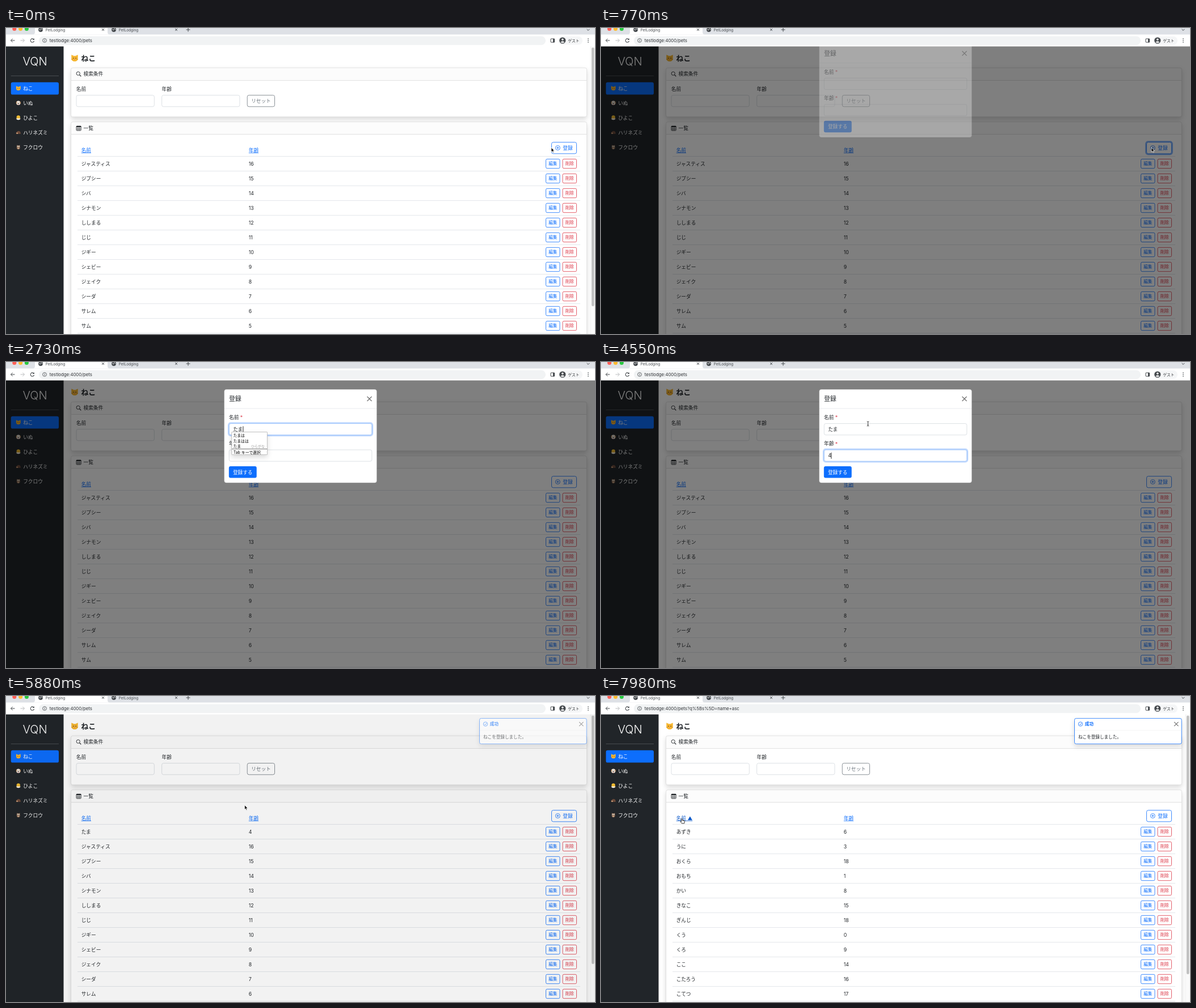
An HTML page for the animation above (8 s loop, 1038 by 540 pixels).

```html
<!DOCTYPE html>
<html>
<head>
<meta charset="utf-8">
<style>
html, body { margin: 0; width: 100%; height: 100%; overflow: hidden; background: #fff; }
svg { display: block; font-family: Inter, "Noto Sans CJK JP", "Noto Sans CJK", sans-serif; }
text { white-space: pre; }
.shadow { filter: drop-shadow(0 4.3px 4.3px rgba(0, 0, 0, .15)); }
.link { text-decoration: underline; }
</style>
</head>
<body>
<svg id="stage" width="1038" height="540" viewBox="0 0 1038 540"></svg>
<script>
const BLUE = '#0d6efd', RED = '#dc3545', GRAY = '#6c757d', INK = '#212529', LINE = '#dee2e6', EDGE = '#ced4da';
const LOOP = 8000, STEP = 70, BASE = 8.67;
const URL_TEXT = 'testlodge:4000/pets';

// ---- markup helpers ----
const text = (x, y, s, size = BASE, fill = INK, more = '') =>
  `<text x="${x}" y="${y}" font-size="${size}" fill="${fill}" ${more}>${s}</text>`;
const rect = (x, y, w, h, fill = 'none', stroke = 'none', r = 0, more = '') =>
  `<rect x="${x}" y="${y}" width="${w}" height="${h}" rx="${r}" fill="${fill}" stroke="${stroke}" ${more}/>`;
const circle = (x, y, r, fill = 'none', stroke = 'none', w = 1) =>
  `<circle cx="${x}" cy="${y}" r="${r}" fill="${fill}" stroke="${stroke}" stroke-width="${w}"/>`;
const path = (d, stroke = INK, w = 1, fill = 'none', more = '') =>
  `<path d="${d}" stroke="${stroke}" stroke-width="${w}" fill="${fill}" ${more}/>`;
const group = (id, body, more = '') => `<g id="${id}" ${more}>${body}</g>`;
const at = (x, y, body, k = 1) => `<g transform="translate(${x} ${y}) scale(${k})">${body}</g>`;
const cross = (x, y, r, stroke, w) => path(`M${x - r} ${y - r}l${2 * r} ${2 * r}m0 ${-2 * r}l${-2 * r} ${2 * r}`, stroke, w);
const ring = (id, x, y, w, h, color) => rect(x - 1.3, y - 1.3, w + 2.6, h + 2.6, 'none', color, 4, `id="${id}" stroke-width="2.2"`);
const MID = 'text-anchor="middle"';

// ---- small animal faces, about 9 px wide ----
const eyes = circle(-1.6, 0, .6, '#3b2a20') + circle(1.6, 0, .6, '#3b2a20');
const cat = path('M-4.4 -4.6L-1 -3 1 -3 4.4 -4.6 4.4 1Q4 4.4 0 4.4 -4 4.4 -4.4 1Z', 'none', 0, '#f7b731') +
  eyes + path('M-4.6 1.6h2M2.6 1.6h2', '#b8741a', .5) + circle(0, 1.6, .6, '#e2697a');
const dog = circle(0, 0, 4.2, '#ece3d8') + path('M-3 -3.4Q-5.6 -2 -4 2.4ZM3 -3.4Q5.6 -2 4 2.4Z', 'none', 0, '#b5793e') +
  eyes + circle(0, 1.5, .9, '#3b2a20') + circle(0, 3.1, .7, '#e2697a');
const chick = circle(0, -1, 3.6, '#fbc531') + path('M-4.4 .8l1.5 1 1.5-1 1.4 1 1.4-1 1.5 1 1.5-1Q4 4.5 0 4.5 -4 4.5 -4.4 .8Z', 'none', 0, '#f5efe2') +
  circle(-1.4, -1.4, .5, '#3b2a20') + circle(1.4, -1.4, .5, '#3b2a20') + circle(0, -.2, .7, '#ee7f2d');
const hedgehog = path('M-4.6 1.5Q-3.4 -3 1 -2.8 4.6 -2.4 4.6 2.8L-2.5 3Z', 'none', 0, '#6b4a3a') +
  path('M-4.8 1.6Q-2.6 -.8 -1 1.4L-1.4 3-3.6 2.8Z', 'none', 0, '#d2a27c') + circle(-4.4, 1.6, .5, '#221a16');
const owl = path('M-3 -4.4L0 -3.4 3 -4.4 3.4 1Q3 4.4 0 4.4 -3 4.4 -3.4 1Z', 'none', 0, '#8a6a55') +
  circle(-1.4, -1.6, 1.2, '#f3ead9') + circle(1.4, -1.6, 1.2, '#f3ead9') + circle(-1.4, -1.6, .5, '#222') +
  circle(1.4, -1.6, .5, '#222') + rect(-1.6, .8, 3.2, 2.8, '#c9ab8d', 'none', 1.4);

// ---- browser frame ----
function tab(x) {
  return circle(x, 3, 3.9, '#45494d') + path(`M${x - 2.6} 1.6l2 1 -.6 1.8M${x + .6} 0l.6 1.8 1.6 .8`, '#fff', .9) +
    text(x + 8.8, 5.5, 'PetLodging', 6.4, '#45494d') + cross(x + 110, 3, 2, '#45494d', .9);
}
function browser() {
  const lights = ['#ff5f57', '#febc2e', '#28c840'].map((c, i) => circle(14.8 + 10.8 * i, 1.4, 3.5, c)).join('');
  const dots = [-3, 0, 3].map(d => circle(1026, 22 + d, .85, '#45494d')).join('');
  return rect(0, 0, 1038, 32.5, '#fff') + rect(0, 0, 1038, 11.5, '#dee1e6') +
    path('M47 11.5Q51 11.5 51 7V0H179V7Q179 11.5 183 11.5Z', 'none', 0, '#fff') +
    lights + tab(61) + tab(190) +
    path('M317.5 3h7M321 -.5v7', '#45494d', 1) + path('M1023.6 2l2.4 2.4 2.4-2.4', '#45494d', 1) +
    path('M15.5 22h-7m3.2-3.2L8.5 22l3.2 3.2', '#45494d', 1) +
    path('M25.5 22h7m-3.2-3.2l3.2 3.2 -3.2 3.2', '#babcbe', 1) +
    path('M49 20.2A3.2 3.2 0 1 0 49.5 23', '#45494d', 1.1) + path('M49.8 18.2v2.9h-2.9Z', 'none', 0, '#45494d') +
    rect(58, 14.5, 893, 15.5, '#f1f3f4', 'none', 7.7) +
    circle(68, 22, 3.4, 'none', '#45494d', .8) + path('M68 21.5v2.3M68 19.8v.9', '#45494d', .9) +
    text(76.8, 24.8, URL_TEXT, 7.8, '#303337', 'id="url"') +
    rect(960, 19, 6.6, 6.2, 'none', '#45494d', .6) + rect(964, 19, 2.8, 6.2, '#45494d') +
    rect(973, 14.8, 43, 14.8, '#f5f6f7', 'none', 7.4) +
    circle(980.8, 22, 5.6, '#45494d') + circle(980.8, 20.3, 1.7, '#fff') + path('M977.4 25Q980.8 21.6 984.2 25Q980.8 27.4 977.4 25Z', 'none', 0, '#fff') +
    text(990.5, 24.7, 'ゲスト', 6.6, '#303337') + dots;
}

// ---- page ----
function sidebar() {
  const items = [[cat, 'ねこ'], [dog, 'いぬ'], [chick, 'ひよこ'], [hedgehog, 'ハリネズミ'], [owl, 'フクロウ']];
  return rect(0, 32, 101.5, 508, INK) + text(51, 66.3, 'VQN', 20, '#fff', MID + ' font-weight="300"') +
    rect(8.7, 84.2, 84.3, .7, '#5b5f63') + rect(8.7, 95.8, 84.3, 21.8, BLUE, 'none', 3.2) +
    items.map(([icon, s], i) => at(21.8, 106.3 + 26 * i, icon, .88) + text(30.2, 109.6 + 26 * i, s, BASE, '#fff')).join('');
}
function rows(id, names, ages) {
  return group(id, names.split(' ').map((s, i) => text(132.7, 242.7 + 26 * i, s) + text(427.8, 242.7 + 26 * i, ages[i])).join(''));
}
function smallButton(x, y, s, color) {
  return rect(x, y, 24.5, 16.4, 'none', color, 2.2, 'stroke-width=".8"') + text(x + 12.25, y + 11, s, 7.58, color, MID);
}
const addLabel = color => circle(972.4, 211.5, 4, 'none', color, .8) + path('M970.2 211.5h4.4M972.4 209.3v4.4', color, .8) +
  text(981.3, 214.8, '登録', BASE, color);
function page() {
  const card = (y, h) => `<g class="shadow">${rect(114.5, y, 909, h, '#fff', '#d8d8d8', 3.2, 'stroke-width=".7"')}</g>` +
    rect(115, y + .5, 908, 21.5, 'rgba(0,0,0,.01)') + rect(115, y + 21.7, 908, .7, '#d4d4d4');
  const first = 'ジャスティス ジプシー シバ シナモン ししまる じじ ジギー シェビー ジェイク シーダ サレム';
  const down = [...Array(12)].map((_, i) => 16 - i);
  let grid = rect(126, 226, 886, .8, LINE);
  for (let i = 0; i < 12; i++) {
    grid += rect(126, 252 + 26 * i, 886, .8, LINE) +
      smallButton(951.5, 231.3 + 26 * i, '編集', BLUE) + smallButton(981, 231.3 + 26 * i, '削除', RED);
  }
  return rect(0, 32, 1038, 508, '#fff') + card(70.3, 86.5) + card(165.7, 400) + sidebar() +
    at(121, 53.2, cat, 1.3) + text(132.3, 57.8, 'ねこ', 13, INK, 'font-weight="700"') +
    circle(127.2, 80.3, 3.1, 'none', INK, .9) + path('M129.5 82.6l2.8 2.8', INK, 1.3) + text(136.5, 84.3, '検索条件') +
    text(123.8, 110.8, '名前') + text(274.6, 110.8, '年齢') +
    rect(124, 118.6, 137.3, 20.2, '#fff', EDGE, 3, 'stroke-width=".7"') + rect(274.6, 118.6, 137.3, 20.2, '#fff', EDGE, 3, 'stroke-width=".7"') +
    rect(425.2, 118.6, 48.3, 20.2, '#fff', GRAY, 3, 'stroke-width=".8"') + text(449.4, 131.9, 'リセット', BASE, GRAY, MID) +
    rect(124, 173, 8.2, 8, 'none', INK, 1, 'stroke-width=".8"') + rect(124, 173, 8.2, 2, INK) +
    path('M126.8 174v7M129.4 174v7M124 177.2h8M124 179.2h8', INK, .6) + text(136.5, 180.3, '一覧') +
    text(132.7, 218.8, '名前', BASE, BLUE, 'id="sort" class="link"') + text(427.8, 218.8, '年齢', BASE, BLUE, 'class="link"') +
    ring('addRing', 961.5, 201.6, 44, 20.2, 'rgba(13,110,253,.5)') +
    rect(961.5, 201.6, 44, 20.2, '#fff', BLUE, 3, 'stroke-width=".8"') + addLabel(BLUE) +
    group('addHover', rect(961.5, 201.6, 44, 20.2, BLUE, BLUE, 3) + addLabel('#fff')) + grid +
    rows('before', first + ' サム', down) + rows('after', 'たま ' + first, [4, ...down]) +
    rows('sorted', 'あずき うに おくら おもち かい きなこ ぎんじ くう くろ ここ こたろう こてつ', [6, 3, 18, 1, 8, 15, 18, 0, 9, 14, 16, 17]) +
    group('scroll', rect(1030, 32, 8, 508, '#fafafa') + rect(1029.8, 32, .6, 508, '#e8e8e8') +
      rect(1032, 34.5, 4.6, 456.5, '#c1c1c1', 'none', 2.3, 'id="thumb"'));
}

// ---- overlays ----
function field(id, label, y) {
  return text(393, y - 7.8, label) + text(412.8, y - 7.3, '*', BASE, RED) +
    rect(393.2, y, 251.6, 20.2, '#fff', EDGE, 3, 'stroke-width=".7"') +
    group(id + 'Focus', ring(id + 'Ring', 393.2, y, 251.6, 20.2, 'rgba(13,110,253,.25)') +
      rect(393.2, y, 251.6, 20.2, '#fff', '#86b7fe', 3, 'stroke-width=".8"')) +
    text(400.2, y + 13.3, '', BASE, INK, `id="${id}"`) + rect(400, y + 4.8, .8, 11, '#000', 'none', 0, `id="${id}Caret"`);
}
function modal() {
  return rect(384.5, 48.2, 269, 165, '#fff', 'rgba(0,0,0,.2)', 4, 'stroke-width=".6"') +
    text(393, 69, '登録', 10.83, INK, 'font-weight="500"') + cross(640.5, 65, 4, '#6f6f6f', 1.2) + rect(385, 81.7, 268, .7, LINE) +
    field('name', '名前', 108.6) + field('age', '年齢', 155) +
    ring('sendRing', 393, 184.2, 48.5, 20.4, 'rgba(49,132,253,.5)') +
    rect(392.8, 184, 48.9, 20.6, BLUE, 'none', 3, 'id="send"') + text(417.2, 197.6, '登録する', BASE, '#fff', MID);
}
function popup() {
  const line = (i, id) => text(400.5, 132 + 9.5 * i, '', 6.9, '#000', `id="${id}"`);
  return `<g class="shadow">${rect(397.8, 123.6, 62.6, 40, '#fff', '#aaa', .5, 'stroke-width=".7"')}</g>` +
    line(0, 'pick0') + line(1, 'pick1') + line(2, 'pick2') + text(432, 150.8, 'ひらがな', 6, '#999') +
    rect(398, 153, 62.2, .8, '#555') + text(400.8, 161.8, 'Tab キーで選択', 6.9, '#000');
}
function toast() {
  return `<g class="shadow">${rect(834.5, 39.4, 188.7, 45.2, '#fff', BLUE, 3, 'stroke-width=".8"')}</g>` +
    circle(845, 49.5, 3.7, 'none', BLUE, .8) + path('M843.2 49.6l1.4 1.4 2.4-3', BLUE, .9) +
    text(852.8, 52.4, '成功', 7.58, BLUE, 'font-weight="700"') + cross(1013.8, 49.5, 3.7, '#6f6f6f', 1.1) +
    rect(835, 60, 187.7, .6, '#f0f0f0') + text(841, 74.7, 'ねこを登録しました。', 7.58);
}
const pointers = group('arrow', path('M0 0V7.8L1.8 6.2 3 9 4.3 8.4 3.1 5.7H5.4Z', '#fff', .7, '#000')) +
  group('hand', path('M-.8 .8Q0 -.4 .8 .8V3.2L4.4 3.9Q5.2 4.2 5 5.4L4.3 8.8H-.2L-2.6 5.6Q-2.4 4.6 -.8 5.6Z', '#000', .8, '#fff') +
    path('M2 3.6v1.4M3.4 3.9v1.3', '#000', .5)) +
  group('beam', path('M-1.8 -4Q0 -4 0 -3Q0 -4 1.8 -4M0 -3.4V3.4M-1.8 4Q0 4 0 3Q0 4 1.8 4M-.9 1.6h1.8', '#222', .8));

const stage = document.getElementById('stage');
stage.innerHTML = page() + rect(0, 32, 1038, 508, '#000', 'none', 0, 'id="shade"') + group('modal', modal()) +
  group('popup', popup()) + group('toast', toast()) + browser() + group('pointer', pointers);
const el = {};
stage.querySelectorAll('[id]').forEach(n => el[n.id] = n);

// ---- timing ----
const clamp = v => Math.max(0, Math.min(1, v));
const ramp = (t, start, len = 150) => clamp((t - start) / len);
const easeOut = p => {
  // cubic-bezier(0, 0, .58, 1)
  let u = p;
  for (let i = 0; i < 8; i++) u -= (1.74 * u * u - .74 * u ** 3 - p) / (3.48 * u - 2.22 * u * u + 1e-6);
  return clamp(3 * u * u - 2 * u ** 3);
};
const fade = (id, v) => el[id].setAttribute('opacity', v);
const show = (id, on) => el[id].style.display = on ? '' : 'none';
const put = (id, s) => { if (el[id].textContent !== s) el[id].textContent = s; };
const within = (t, spans) => spans.some(([a, b]) => t >= a && t < b);
const last = (t, table) => table.filter(k => k[0] <= t).pop();

const MOVES = [[0, 961, 211], [280, 970, 211], [770, 970, 211], [1190, 471, 111], [1330, 470.5, 109],
  [4550, 470.5, 109], [5250, 421.5, 193], [5740, 421.5, 193], [5880, 420.5, 192.5], [6020, 420.5, 192.5],
  [6860, 144, 217.5], [7070, 142.5, 216]];
const POINTERS = [[0, 'arrow'], [140, 'hand'], [560, 'arrow'], [1120, 'beam'], [2380, ''], [4550, 'beam'],
  [4760, 'arrow'], [4900, 'beam'], [5030, 'hand'], [5850, 'arrow'], [6860, 'hand']];

function movePointer(t) {
  const i = MOVES.findIndex(m => m[0] > t);
  const b = MOVES[i < 0 ? MOVES.length - 1 : i], a = i < 0 ? b : MOVES[i - 1];
  const p = a === b ? 0 : (t - a[0]) / (b[0] - a[0]), e = p * p * (3 - 2 * p);
  el.pointer.setAttribute('transform', `translate(${a[1] + (b[1] - a[1]) * e} ${a[2] + (b[2] - a[2]) * e})`);
  const kind = last(t, POINTERS)[1];
  ['arrow', 'hand', 'beam'].forEach(k => show(k, k === kind));
}

function draw(t) {
  const OPEN = 722, CLOSE = 5440;
  fade('shade', .5 * (ramp(t, 572) - ramp(t, 5745)));
  fade('modal', ramp(t, OPEN) - ramp(t, CLOSE));
  show('modal', t > OPEN && t < CLOSE + 150);
  const drop = easeOut(ramp(t, OPEN, 300)) - easeOut(ramp(t, CLOSE, 300));
  el.modal.setAttribute('transform', `translate(0 ${-27 * (1 - drop)})`);

  fade('addHover', ramp(t, 110) - ramp(t, 570));
  fade('addRing', ramp(t, 410) - ramp(t, 1440));
  fade('nameFocus', ramp(t, 1440) - ramp(t, 3240));
  fade('ageFocus', ramp(t, 3240) - ramp(t, 5340));
  fade('sendRing', ramp(t, 5340));
  el.send.setAttribute('fill', t >= 5030 ? '#0b5ed7' : BLUE);

  const typed = last(t, [[0, ''], [2520, 'た'], [2730, 'たま']])[1];
  put('name', typed);
  put('age', t >= 4200 ? '4' : '');
  el.nameCaret.setAttribute('x', 400.2 + typed.length * BASE);
  el.ageCaret.setAttribute('x', t >= 4200 ? 405.5 : 400.2);
  show('nameCaret', within(t, [[1540, 2030], [2520, 3290]]));
  show('ageCaret', within(t, [[3290, 3780], [4200, 4690], [5180, 5390]]));
  show('popup', t >= 2520 && t < 3080);
  fade('popup', t < 2590 ? .6 : 1);
  const picks = t < 2730 ? ['たま', 'たまは', 'た'] : ['たまは', 'たまはは', 'たま'];
  picks.forEach((s, i) => put('pick' + i, s));

  const sorted = t >= 7280;
  show('before', t < 5460);
  show('after', t >= 5460 && !sorted);
  show('sorted', sorted);
  put('url', URL_TEXT + (sorted ? '?q%5Bs%5D=name+asc' : ''));
  put('sort', sorted ? '名前\u00a0▲' : '名前');
  el.sort.setAttribute('fill', t >= 6860 ? '#0a58ca' : BLUE);
  show('scroll', t < 560 || t >= 5880);
  el.thumb.setAttribute('height', t >= 5880 && !sorted ? 438.5 : 456.5);
  fade('toast', ramp(t, 5790));
  movePointer(t);
}

function tick() {
  draw(Math.floor(performance.now() % LOOP / STEP) * STEP);
  requestAnimationFrame(tick);
}
tick();
</script>
</body>
</html>
```
